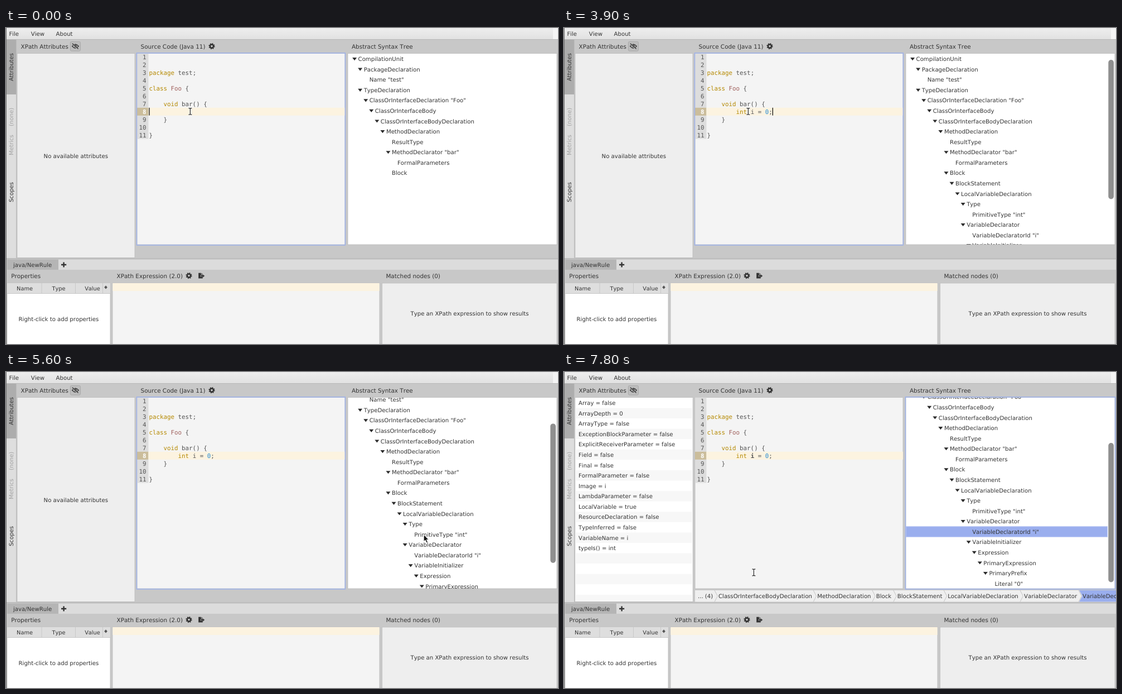
An HTML page for the animation above (8 s loop, 990 by 566 pixels).

```html
<!DOCTYPE html>
<html lang="en">
<head>
<meta charset="utf-8">
<title>Rule designer</title>
<style>
html, body { margin: 0; width: 100%; height: 100%; overflow: hidden; background: #c8c8c8; }
svg { display: block; width: 990px; height: 566px; }
text {
  font: 10.15px "DejaVu Sans", sans-serif; fill: #333; white-space: pre;
  font-kerning: none; text-rendering: geometricPrecision;
}
.title { font-size: 10.42px; }
.column { font-size: 9.8px; }
.code { font: 10.83px "DejaVu Sans Mono", monospace; fill: #555; }
.middle { text-anchor: middle; }
.end { text-anchor: end; }
.dim { fill: #a2a2a2; }
.keyword { fill: #b58900; }
.type { fill: #a0605c; }
.number { fill: #268bd2; }
.bold { font-weight: bold; }
.light { fill: #fff; }
</style>
</head>
<body>
<svg id="stage" viewBox="0 0 990 566">
  <defs>
    <linearGradient id="menu" x2="0" y2="1">
      <stop stop-color="#eeeeee"/><stop offset="1" stop-color="#e1e1e1"/>
    </linearGradient>
    <clipPath id="treeClip"><rect x="613" y="45.6" width="375" height="342.4"/></clipPath>
    <g id="gear" fill="none" stroke="#333">
      <circle r="3.1" stroke-width="2.6"/>
      <circle r="4.7" stroke-width="1.8" stroke-dasharray="1.85 1.84"/>
    </g>
  </defs>
</svg>
<script>
const NS = 'http://www.w3.org/2000/svg';
const stage = document.getElementById('stage');
const ROW = 18.57, LINE = 13.96, CHAR = 6.52, CODE_X = 256.4, LOOP = 8000;

function add(parent, tag, attrs = {}, content) {
  const node = document.createElementNS(NS, tag);
  for (const key in attrs) node.setAttribute(key, attrs[key]);
  if (content !== undefined) node.textContent = content;
  parent.appendChild(node);
  return node;
}
const group = (parent = stage, attrs) => add(parent, 'g', attrs);
const box = (x, y, right, bottom, fill, parent = stage, more = {}) =>
  add(parent, 'rect', { x, y, width: right - x, height: bottom - y, fill, ...more });
const path = (d, fill, parent = stage, more = {}) => add(parent, 'path', { d, fill, ...more });
// Text is placed by the vertical middle of its capitals.
const label = (x, y, content, cls = '', parent = stage) =>
  add(parent, 'text', { x, y: y + 3.7, class: cls }, content);
const sideLabel = (y, content, cls = '') =>
  add(stage, 'text', { transform: `translate(13.4 ${y}) rotate(-90)`, class: 'middle ' + cls }, content);
const show = (node, on) => node.setAttribute('visibility', on ? 'visible' : 'hidden');
const move = (node, x, y) => node.setAttribute('transform', `translate(${x} ${y})`);
const edge = { stroke: '#bcbcbc', 'stroke-width': 0.8 };

function drawChrome() {
  box(0, 0, 990, 20.5, 'url(#menu)');
  box(981, 0, 990, 20.5, '#f4f4f4');
  box(0, 20, 990, 21, '#b9b9b9');
  label(5.4, 10.3, 'File');
  label(44.8, 10.3, 'View');
  label(89.6, 10.3, 'About');

  box(1, 21, 18, 412, '#dedede');
  box(1, 21, 18, 119, '#adadad');
  box(18, 21, 19, 412, '#bdbdbd');
  sideLabel(70, 'Attributes');
  sideLabel(159.5, '(none)', 'dim');
  sideLabel(209.5, 'Metrics', 'dim');
  sideLabel(294, 'Scopes');

  label(26.6, 32.8, 'XPath Attributes', 'title');
  box(115.4, 24.4, 133.4, 41.2, '#bdbdbd', stage, { rx: 2, stroke: '#a3a3a3', 'stroke-width': 0.8 });
  path('M118.6 32.6Q124.4 25.8 130.2 32.6Q124.4 39.4 118.6 32.6Z', 'none', stage,
    { stroke: '#333', 'stroke-width': 1.4 });
  add(stage, 'circle', { cx: 124.4, cy: 32.6, r: 2.3, fill: '#333' });
  path('M119.2 28L129 37.8', 'none', stage, { stroke: '#bdbdbd', 'stroke-width': 2.6 });
  path('M118.9 27.7L129.6 37.6', 'none', stage, { stroke: '#333', 'stroke-width': 1.3 });
  box(20, 45.6, 231, 411.4, '#eeeeee', stage, edge);

  label(241.6, 32.8, 'Source Code (Java 11)', 'title');
  add(stage, 'use', { href: '#gear', x: 369, y: 32.6 });
  label(620, 32.8, 'Abstract Syntax Tree', 'title');

  box(0, 412.4, 990, 414.6, '#bcbcbc');
  box(0, 414.6, 990, 433, '#dcdcdc');
  box(1.5, 414.6, 94, 433, '#b5b5b5');
  label(13, 424, 'java/NewRule');
  path('M99 424h9.2M103.6 419.4v9.2', 'none', stage, { stroke: '#333', 'stroke-width': 2.4 });

  label(9.2, 443.9, 'Properties', 'title');
  box(2, 457, 187, 567, '#fff', stage, edge);
  box(2, 457, 187, 475.5, '#dedede');
  box(2, 475, 187, 476, '#c6c6c6');
  for (const x of [63.5, 124, 173]) box(x, 457, x + 0.9, 475, '#c6c6c6');
  label(33.5, 466.6, 'Name', 'column middle');
  label(94.5, 466.6, 'Type', 'column middle');
  label(155, 466.6, 'Value', 'column middle');
  path('M179 461.2l2.8 3.2-2.8 3.2-2.8-3.2Z', '#555');
  label(94.4, 521.5, 'Right-click to add properties', 'middle');

  label(198.6, 443.9, 'XPath Expression (2.0)', 'title');
  add(stage, 'use', { href: '#gear', x: 328, y: 443.6 });
  path('M345.2 438.8h4.6v3.2h3v1h-4v2.2h4v3.4h-7.6Z', '#333');
  path('M350.6 438.8l2.4 2.5h-2.4ZM353.2 441.4l3 2.7-3 2.7v-1.8h-3.4v-1.7h3.4Z', '#333');
  box(191, 457, 670, 567, '#f4f4f4', stage, edge);
  box(191.4, 457, 669.6, 471, '#fcf3e0');

  label(681.4, 443.9, 'Matched nodes (0)', 'title');
  box(674.4, 457, 988, 567, '#eeeeee', stage, edge);
  label(831.5, 511.6, 'Type an XPath expression to show results', 'middle');

  box(0, 0, 1, 566, '#707070');
}

function drawAttributes() {
  const list = group();
  const names = ['Array = false', 'ArrayDepth = 0', 'ArrayType = false',
    'ExceptionBlockParameter = false', 'ExplicitReceiverParameter = false', 'Field = false',
    'Final = false', 'FormalParameter = false', 'Image = i', 'LambdaParameter = false',
    'LocalVariable = true', 'ResourceDeclaration = false', 'TypeInferred = false',
    'VariableName = i', 'typeIs() = int'];
  box(20.4, 46, 230.6, 411, '#fff', list);
  for (let i = 1; i < 20; i += 2) {
    const top = 46 + i * ROW;
    box(20.4, top, 230.6, Math.min(top + ROW, 411), '#f7f7f7', list);
  }
  names.forEach((name, i) => label(26, 55.4 + i * ROW, name, '', list));
  return list;
}

function codeText(line, column, parts) {
  const text = add(stage, 'text',
    { x: CODE_X + column * CHAR, y: 55.9 + (line - 1) * LINE, class: 'code' });
  return parts.map(([content, cls = '']) => add(text, 'tspan', { class: cls }, content));
}

function drawEditor() {
  box(235, 45.6, 608, 388, '#f4f4f4', stage, edge);
  box(235, 45.6, 255.4, 198.6, '#dddddd');
  box(235, 142.8, 255.4, 156.8, '#cbbd9b');
  box(255.4, 142.8, 608, 156.8, '#fcf3e0');
  for (let n = 1; n <= 11; n++) {
    const cls = 'code end ' + (n === 8 ? 'bold light' : '');
    add(stage, 'text', { x: 251.6, y: 55.9 + (n - 1) * LINE, class: cls }, n);
  }
  codeText(3, 0, [['package', 'keyword'], [' test;']]);
  codeText(5, 0, [['class', 'keyword'], [' '], ['Foo', 'type'], [' {']]);
  codeText(7, 4, [['void', 'keyword'], [' bar() {']]);
  codeText(9, 4, [['}']]);
  codeText(11, 0, [['}']]);
  return codeText(8, 8, [['', 'keyword'], [''], [''], [''], ['', 'number'], ['']]);
}

function drawTree() {
  const rows = [[0, 'CompilationUnit'], [1, 'PackageDeclaration'], [2, 'Name "test"'],
    [1, 'TypeDeclaration'], [2, 'ClassOrInterfaceDeclaration "Foo"'], [3, 'ClassOrInterfaceBody'],
    [4, 'ClassOrInterfaceBodyDeclaration'], [5, 'MethodDeclaration'], [6, 'ResultType'],
    [6, 'MethodDeclarator "bar"'], [7, 'FormalParameters'], [6, 'Block'], [7, 'BlockStatement'],
    [8, 'LocalVariableDeclaration'], [9, 'Type'], [10, 'PrimitiveType "int"'],
    [9, 'VariableDeclarator'], [10, 'VariableDeclaratorId "i"'], [10, 'VariableInitializer'],
    [11, 'Expression'], [12, 'PrimaryExpression'], [13, 'PrimaryPrefix'], [14, 'Literal "0"']];
  box(613, 45.6, 988, 388, '#fff', stage, edge);
  const selection = box(613.4, 276.8, 974.6, 295.3, '#9aaeee', stage, { stroke: '#b9c7f4', 'stroke-width': 1 });
  const content = group(group(stage, { 'clip-path': 'url(#treeClip)' }));
  const base = group(content), grown = group(content);
  rows.forEach(([depth, name], i) => {
    const y = 55.4 + i * ROW, shift = depth * 10.06;
    label(631.6 + shift, y, name, '', i < 12 ? base : grown);
    if (i + 1 < rows.length && rows[i + 1][0] > depth) {
      path(`M${621.1 + shift} ${y - 2.4}h8l-4 5.2Z`, '#2c2c2c', i < 11 ? base : grown);
    }
  });
  const thumb = box(976.3, 57, 986, 306.5, '#8f8f8f', stage, { rx: 4.8 });
  return { content, grown, selection, thumb };
}

function drawBreadcrumbs() {
  const bar = group();
  box(235, 391, 990, 411.6, '#efefef', bar);
  path('M924 391H990V411.6H924L929.6 401.3Z', '#9aaeee', bar);
  const crumbs = [[240, '... (4)'], [277, 'ClassOrInterfaceBodyDeclaration'], [454.2, 'MethodDeclaration'],
    [559.8, 'Block'], [597.8, 'BlockStatement'], [688.2, 'LocalVariableDeclaration'],
    [825, 'VariableDeclarator'], [930, 'VariableDeclaratorId']];
  crumbs.forEach(([x, name], i) => {
    label(x, 401.4, name, '', bar);
    if (i) path(`M${x - 7} 391l5.4 10.3-5.4 10.3`, 'none', bar, { stroke: '#c4c4c4', 'stroke-width': 1 });
  });
  return bar;
}

drawChrome();
const placeholder = label(125.3, 228.9, 'No available attributes', 'middle');
const attributes = drawAttributes();
const typed = drawEditor();
const tree = drawTree();
const breadcrumbs = drawBreadcrumbs();

const focus = { fill: 'none', stroke: '#9fb2e8', 'stroke-width': 1.6, height: 344 };
const editorFocus = add(stage, 'rect', { x: 234.4, y: 44.8, width: 374, ...focus });
const treeFocus = add(stage, 'rect', { x: 612.4, y: 44.8, width: 376.2, ...focus });
const caret = box(0, 142.8, 1.2, 156.6, '#000');

const warning = group();
path('M601 27L606.4 37.4H595.6Z', '#d40000', warning,
  { stroke: '#d40000', 'stroke-width': 1.4, 'stroke-linejoin': 'round' });
path('M601 30v3.9M601 35v1.5', 'none', warning, { stroke: '#fff', 'stroke-width': 1.4 });

const beam = group();
const beamShape = 'M-2.9 -5.8H-1L0 -5L1 -5.8H2.9M0 -5V5M-2.9 5.8H-1L0 5L1 5.8H2.9';
path(beamShape, 'none', beam, { stroke: '#fff', 'stroke-width': 2.6 });
path(beamShape, 'none', beam, { stroke: '#222', 'stroke-width': 1.2 });
const arrow = group();
path('M0 0V12.2L2.8 9.7L5 14.4L7.2 13.4L5 8.9H8.7Z', '#111', arrow, { stroke: '#fff', 'stroke-width': 0.8 });

// Each track lists [start, ...values]; a value holds until the next start.
const typing = [[0, 0], [1200, 1], [1300, 2], [1400, 3], [1500, 4], [1900, 5], [2100, 6],
  [3100, 8], [3300, 9], [3700, 10]];
const blinking = [[0, 1], [200, 0], [600, 1], [1100, 0], [1200, 1], [4200, 0], [4700, 1],
  [5300, 0], [5700, 1], [6300, 0]];
const scrolling = [[0, 0], [5600, 43], [5700, 85]];
const pointing = [[0, 330.4, 149.4, beam], [4200, 346, 222, beam], [4300, 376, 372, beam],
  [4400, 393, 461, beam], [4700, 430, 480, beam], [4800, 520, 472, beam], [4900, 610, 410, arrow],
  [5000, 692, 330, arrow], [5100, 737, 291, arrow], [5300, 749.2, 291.4, arrow],
  [5900, 762, 290, arrow], [6000, 772, 287.4, arrow], [6300, 773, 288, arrow],
  [7100, 690, 268, arrow], [7200, 540, 232, beam], [7300, 370, 204, beam], [7400, 260, 188, beam],
  [7600, 257, 220, beam], [7700, 304, 312, beam], [7800, 340.4, 359, beam]];
const at = (track, time) => track.findLast(step => step[0] <= time).slice(1);

const STATEMENT = 'int i = 0;', TOKEN_ENDS = [3, 4, 5, 8, 9, 10];

function render() {
  const time = performance.now() % LOOP;
  const [count] = at(typing, time), [blink] = at(blinking, time), [scroll] = at(scrolling, time);
  const parsed = time >= 3900, selected = time >= 6600;

  typed.forEach((token, i) => {
    token.textContent = STATEMENT.slice(i ? TOKEN_ENDS[i - 1] : 0, Math.min(count, TOKEN_ENDS[i]));
  });
  typed[2].setAttribute('class', selected ? 'bold' : '');
  caret.setAttribute('x', CODE_X + CHAR * (time < 600 ? 0 : 8 + count));
  show(caret, blink);
  show(warning, time >= 1600 && !parsed);

  show(tree.grown, parsed);
  show(tree.thumb, parsed);
  move(tree.content, 0, -scroll);
  move(tree.thumb, 0, scroll * 70 / 85);

  for (const node of [attributes, breadcrumbs, tree.selection, treeFocus]) show(node, selected);
  for (const node of [placeholder, editorFocus]) show(node, !selected);

  const [x, y, pointer] = at(pointing, time);
  show(beam, pointer === beam);
  show(arrow, pointer === arrow);
  move(pointer, x, y);
  requestAnimationFrame(render);
}
render();
</script>
</body>
</html>
```
